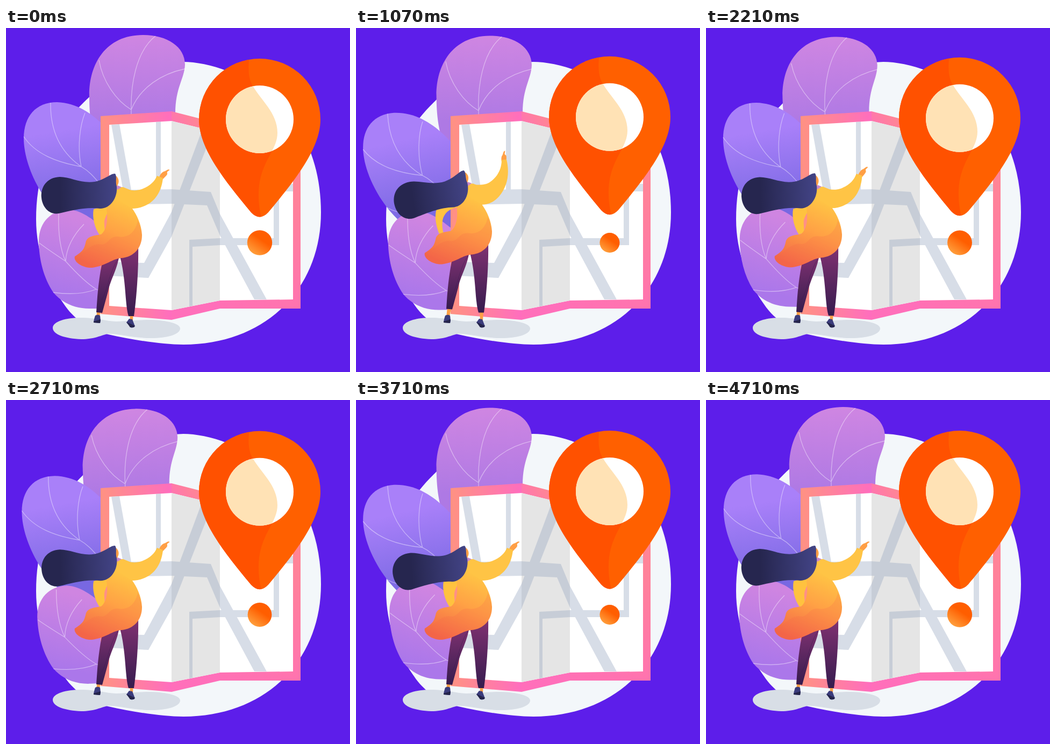
An HTML page for the animation above (4.78 s loop, 640 by 640 pixels).

```html
<!DOCTYPE html>
<html lang="en">
<head>
<meta charset="utf-8">
<title>Map and location pin</title>
<style>
  html, body { margin: 0; width: 100%; height: 100%; overflow: hidden; background: #5d1eea; }
  svg { display: block; width: 100%; height: 100%; }
  .veins { fill: none; stroke: #fff; stroke-opacity: .42; stroke-width: 1.3; }
</style>
</head>
<body>
<svg viewBox="0 0 640 640">
  <defs>
    <linearGradient id="topLeafFill" x2="0" y2="1"><stop stop-color="#cf86e2"/><stop offset=".7" stop-color="#ae79e4"/></linearGradient>
    <linearGradient id="blueLeafFill" x2=".12" y2="1"><stop offset=".25" stop-color="#a980f9"/><stop offset=".85" stop-color="#7868e2"/></linearGradient>
    <linearGradient id="pinkLeafFill" x1=".5" x2=".25" y2="1"><stop offset=".1" stop-color="#cf85e1"/><stop offset=".85" stop-color="#ab77ea"/></linearGradient>
    <linearGradient id="frameLeft"><stop stop-color="#ff9282"/><stop offset="1" stop-color="#ff6dbe"/></linearGradient>
    <linearGradient id="frameMid" gradientUnits="userSpaceOnUse" x1="312" y1="210" x2="372" y2="170"><stop stop-color="#ff6fba"/><stop offset="1" stop-color="#ff8a8c"/></linearGradient>
    <linearGradient id="frameRight" gradientUnits="userSpaceOnUse" x1="420" y1="540" x2="540" y2="230"><stop stop-color="#ff6fb6"/><stop offset="1" stop-color="#ff8890"/></linearGradient>
    <linearGradient id="dotFill" x1=".75" y1=".15" x2=".2" y2=".95"><stop offset=".3" stop-color="#ff5e00"/><stop offset="1" stop-color="#ffa23f"/></linearGradient>
    <linearGradient id="hairFill"><stop offset=".25" stop-color="#26264f"/><stop offset="1" stop-color="#434486"/></linearGradient>
    <linearGradient id="coatFill" x1=".7" x2=".35" y2="1"><stop offset=".15" stop-color="#ffc444"/><stop offset=".55" stop-color="#ffa045"/><stop offset="1" stop-color="#f36748"/></linearGradient>
    <linearGradient id="pantsFill" x2="0" y2="1"><stop offset=".1" stop-color="#7d3170"/><stop offset="1" stop-color="#361b4e"/></linearGradient>
    <clipPath id="pinClip"><path id="pinShape" d="M472 57A113 113 0 0 1 585 170C585 225 536 285 488 343Q472 360 456 343C408 285 359 225 359 170A113 113 0 0 1 472 57Z"/></clipPath>
    <clipPath id="holeClip"><circle cx="472" cy="170" r="63"/></clipPath>
    <path id="pinSide" d="M453 50C449 85 453 98 460 109C474 134 505 158 505 195C505 230 470 250 470 310C470 330 473 345 477 360H350V50Z"/>
  </defs>

  <path fill="#f3f7fa" d="M330 63C375 63 450 85 505 140C540 180 560 213 568 235C580 268 586 305 586 343C586 484 484 589 330 589C290 589 235 580 190 570C155 562 125 540 108 514C80 475 56 420 56 356C56 275 80 202 144 139C190 92 260 65 330 63Z"/>

  <g id="topLeaf">
    <path fill="url(#topLeafFill)" d="M180 240C158 205 155 160 155 130C153 72 182 13 255 13C300 13 333 35 333 68C332 95 315 110 315 160V240Z"/>
    <path class="veins" d="M233 165V152C232 110 240 45 278 15M233 152C205 135 180 100 173 60M233 152C250 110 290 85 333 76"/>
  </g>
  <g id="blueLeaf">
    <path fill="url(#blueLeafFill)" d="M33 205C33 165 55 138 95 138C130 139 160 158 185 185L215 220V390H170C140 380 115 362 98 346C60 310 33 250 33 205Z"/>
    <path class="veins" d="M185 302C168 283 158 268 140 258C100 230 82 190 83 139M140 258C95 250 55 235 33 202M140 258C132 220 138 180 147 158M180 310C140 335 95 330 70 313"/>
  </g>
  <g id="pinkLeaf">
    <path fill="url(#pinkLeafFill)" d="M61 395C62 360 85 338 118 338C145 340 165 360 185 375L240 522H155C128 522 105 512 88 492C70 465 61 430 61 395Z"/>
    <path class="veins" d="M180 491L168 486C150 475 130 455 111 434C100 410 97 375 98 345M111 434C90 420 75 410 62 400M111 434C112 410 125 385 145 365M168 486C140 497 110 495 88 492"/>
  </g>

  <path fill="url(#frameLeft)" d="M176 164L308 155V543L176 532Z"/>
  <path fill="url(#frameMid)" d="M308 155L398 178V522L308 543Z"/>
  <path fill="url(#frameRight)" d="M398 178H548V522H398Z"/>
  <path fill="#fff" d="M192 180L308 173L398 195H534V505L398 507L308 525L192 517Z"/>
  <path fill="#e5e5e5" d="M308 173L398 195V507L308 525Z"/>
  <g fill="#9aa9c3" opacity=".385">
    <path d="M196 180L211 179L233 301L308 300L381 305L398 346L485 505H462L398 386L374 330L308 327L192 329V303H218ZM279 175L288 174V302H279Z"/>
    <path d="M308 342L364 192L380 205L308 388L265 465L192 461V435L257 437ZM341 394L398 391H498V290H534V304H508V404H398L347 407V517L341 518Z"/>
  </g>

  <path fill="#d8dee6" d="M87 558C87 545 115 538 145 539C170 540 185 545 205 546C230 545 245 543 270 543C300 544 324 550 324 559C324 570 300 577 270 577C235 577 210 568 190 569C175 572 165 579 140 579C110 578 87 570 87 558Z"/>

  <path fill="#ff9f45" d="M170 520H177L174 538H168ZM230 526H237L236 545H231Z"/>
  <path fill="#3b3c7c" d="M166 535Q171 532 175 535L176 544L175 549L163 548Q163 544 166 535ZM229 541L235 542L240 555L234 558L224 548Z"/>
  <path fill="#24244a" d="M163 546L176 542L175 549L163 548ZM224 547L240 554L238 557L231 557Z"/>
  <g id="body">
    <path fill="url(#pantsFill)" d="M184 415H212C208 450 195 465 190 490L179 530L168 529C170 500 172 460 184 415Z"/>
    <path fill="url(#pantsFill)" d="M208 400H246C247 450 243 500 238 536H228C221 515 224 470 212 425Z"/>
    <path fill="none" stroke="#36194e" stroke-opacity=".4" d="M208 430C190 460 192 480 178 506"/>
    <path id="leftArm" fill="#ffc23f"/>
    <path fill="url(#coatFill)" d="M207 296C195 310 190 325 187 338C190 355 188 375 177 384C165 386 153 387 149 396C146 408 146 414 128 425C125 435 143 447 160 446C185 443 200 428 215 428C237 426 253 410 253 385C252 365 243 347 235 336L240 305L218 296Z"/>
    <path fill="#f0604a" fill-opacity=".18" d="M245 358C242 378 228 392 208 388C190 387 190 407 172 402C155 404 150 416 128 425C125 435 143 447 160 446C185 443 200 428 215 428C237 426 253 410 253 385Q251 370 245 358Z"/>
    <path id="hand" fill="#ff9f45" d="M-4 4C-6 -3 -5 -8 -3 -10L-1 -16Q0 -18 2 -18L1 -12L4 -9C5 -5 4 0 4 4Z"/>
    <path id="rightArm" fill="#ffc445"/>
    <g id="head">
      <path fill="#c98bc8" d="M203 291L215 296L207 301Z"/>
      <path fill="#ff9f45" d="M202 274C208 276 211 283 209 289L207 294L199 293Z"/>
      <path id="hair" fill="url(#hairFill)" d="M203 271C195 270 185 282 165 286C140 290 120 277 100 277C75 278 64 297 66 316C68 335 82 348 98 345C120 340 150 332 175 336C195 336 208 315 206 295C203 285 207 276 203 271Z"/>
    </g>
  </g>

  <circle id="dot" cx="472" cy="399.5" fill="url(#dotFill)"/>
  <g id="pin">
    <use href="#pinShape" fill="#ff6000"/>
    <use href="#pinSide" fill="#ff5100" clip-path="url(#pinClip)"/>
    <circle cx="472" cy="170" r="63" fill="#fff"/>
    <use href="#pinSide" fill="#ffe2b5" clip-path="url(#holeClip)"/>
  </g>
</svg>
<script>
const LOOP = 4780, STEPS = 67, STEP = LOOP / STEPS, TAU = Math.PI * 2;
const BOB_PERIOD = 912, BOB_END = BOB_PERIOD * 3.5;
const el = id => document.getElementById(id);
const mix = (a, b, k) => a + (b - a) * k;
const ease = x => { x = Math.min(1, Math.max(0, x)); return x * x * (3 - 2 * x); };

// Resting and raised outlines of each arm
const arms = {
  leftArm: [
    'M190 330C182 334 172 334 163 337C160 352 165 372 174 385L183 381C185 372 181 362 184 355C186 350 188 345 190 342Z',
    'M187 328C170 332 153 338 149 345C145 361 150 378 154 389L162 388C159 376 158 362 166 352C172 345 180 341 190 340Z'],
  rightArm: [
    'M215 297C228 302 240 304 252 300C268 294 276 286 281 275L292 279C290 300 280 320 262 329C252 334 244 336 234 336L210 320Z',
    'M215 297C225 299 240 299 248 294C262 285 271 270 271 252L280 251C286 275 283 300 266 320C256 331 246 335 234 335L210 320Z']
};

function mixPath(id, k) {
  const [from, to] = arms[id], ends = to.match(/[\d.]+/g);
  let i = 0;
  el(id).setAttribute('d', from.replace(/[\d.]+/g, v => mix(+v, +ends[i++], k).toFixed(2)));
}
const place = (id, transform) => el(id).setAttribute('transform', transform);
const turn = (id, degrees, x, y) => place(id, `rotate(${degrees} ${x} ${y})`);

function draw(ms) {
  const step = Math.min(STEPS - 1, Math.floor((ms % LOOP + 3) / STEP));
  const t = step * STEP, p = step / STEPS;
  const sway = k => (1 - Math.cos(TAU * k * p)) / 2;
  const raise = ease(p * 6) - ease(p * 6 - 2);

  turn('topLeaf', -1.72 * sway(1), 365, 550);
  turn('blueLeaf', -3.95 * sway(2), 377, 510);
  turn('pinkLeaf', -2.5 * Math.sin(TAU * 2 * p), 335, 485);

  place('body', `translate(0 ${-6.5 * raise})`);
  turn('head', -4.3 * raise, 206, 292);
  turn('hair', -4.3 * sway(2), 205, 282);
  mixPath('leftArm', p < .5 ? sway(2) : 0);
  mixPath('rightArm', raise);
  place('hand', `translate(${mix(291, 275.5, raise)} ${mix(276, 253, raise)}) rotate(${mix(42, 0, raise)})`);

  place('pin', `translate(0 ${t < BOB_END ? -4.8 * Math.sin(TAU * t / BOB_PERIOD) : 0})`);
  el('dot').setAttribute('r', 20.8 + 2.4 * Math.cos(TAU * 2 * p));
}

const start = performance.now();
function tick(now) {
  draw(Math.max(0, now - start));
  requestAnimationFrame(tick);
}
draw(0);
requestAnimationFrame(tick);
</script>
</body>
</html>
```
